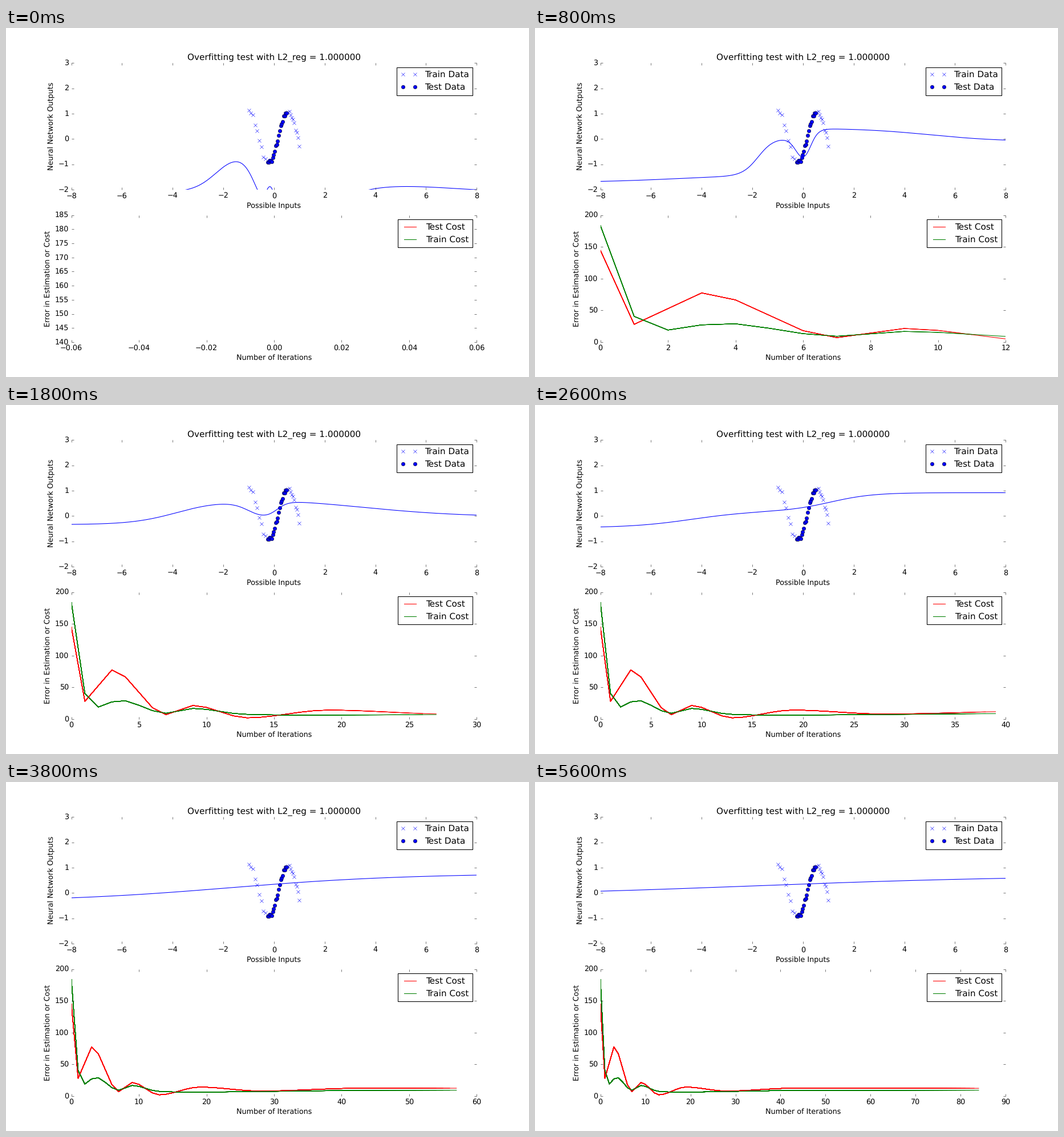
Recreate the animation shown at these times as a matplotlib script. Size 917 by 611 pixels, loop 5.8 s.

```python
import matplotlib.pyplot as plt
import numpy as np
from matplotlib.animation import FuncAnimation
from matplotlib.ticker import MultipleLocator

W, H = 917, 611
DPI = H / 8
FRAMES, STRIDE = 29, 3
LAST = (FRAMES - 1) * STRIDE

plt.style.use("classic")
plt.rcParams.update({
    "font.family": "DejaVu Sans",
    "text.hinting": "none",
    "figure.facecolor": "white",
    "savefig.dpi": "figure",
})

rng = np.random.default_rng(4)
steps = np.arange(LAST + 1)
grid = np.linspace(-8, 8, 801)


def noisy(x):
    """Samples of the wave the network has to learn."""
    return 0.05 + np.sin(4.1 * x - 0.67) + rng.uniform(-0.09, 0.09, len(x))


def swing(turns):
    """Cost curve easing from one turning point (step, cost) to the next."""
    at, cost = np.array(turns).T
    i = np.clip(np.searchsorted(at, steps, side="right") - 1, 0, len(at) - 2)
    u = (steps - at[i]) / (at[i + 1] - at[i])
    return cost[i] + (cost[i + 1] - cost[i]) * u * u * (3 - 2 * u)


def net(start, *units):
    """Network output: a start level plus tanh units (size, centre, weight)."""
    return start + sum(a * (1 + np.tanh(w * (grid - c))) for a, c, w in units)


train_x = np.r_[-1 + np.arange(9) / 12, 0.55 + np.arange(10) / 20]
test_x = np.linspace(-0.25, 0.5, 20)

test_cost = swing([(0, 144.8), (1, 28), (3, 77.5), (7, 7), (9, 21.5), (13, 2),
                   (19, 14.2), (28, 8), (43, 12.5), (LAST, 12.3)])
train_cost = swing([(0, 183.8), (1, 40.5), (2, 19), (3.5, 30), (7, 9.2),
                    (9, 16.8), (13, 7.5), (16, 6.3), (48, 9.2), (LAST, 9.3)])

# Network output after the given number of iterations
fits = {
    0: net(-2.1, (0.8, -2.25, 1.1), (-1.4, -0.7, 1.8), (0.65, -0.31, 6),
           (-0.65, 0.05, 6), (0.8, 2.3, 0.6), (-0.22, 6.8, 0.3)),
    12: net(-1.71, (0.15, -5, 0.3), (0.75, -1.77, 1.6), (-0.6, -0.25, 3),
            (0.775, 0.28, 3.2), (-0.27, 5, 0.35)),
    27: net(-0.335, (0.5, -3.8, 0.55), (-0.34, -1, 1.5), (0.37, 0.1, 2.2),
            (-0.38, 3.5, 0.25)),
    39: net(-0.46, (0.33, -4.4, 0.42), (0.36, 1.1, 0.6)),
    48: net(-0.53, (0.69, -1.7, 0.16)),
    69: net(-0.18, (0.45, -2, 0.09)),
    84: net(-0.14, (0.42, -2, 0.09)),
}


def fit_at(n):
    keys = list(fits)
    i = min(np.searchsorted(keys, n, side="right"), len(keys) - 1)
    a, b = keys[i - 1], keys[i]
    u = (n - a) / (b - a)
    return (1 - u) * fits[a] + u * fits[b]


def nice_step(span, bins=9):
    raw = span / bins
    base = 10.0 ** np.floor(np.log10(raw))
    return next(m * base for m in (1, 2, 5, 10) if m * base >= raw - 1e-9)


def set_scale(x0, x1, dx, y0, y1, dy):
    bottom.set_xlim(x0, x1)
    bottom.set_ylim(y0, y1)
    bottom.xaxis.set_major_locator(MultipleLocator(dx))
    bottom.yaxis.set_major_locator(MultipleLocator(dy))


fig = plt.figure(figsize=((W + 0.001) / DPI, H / DPI), dpi=DPI)
top = fig.add_subplot(211, frameon=False)
bottom = fig.add_subplot(212, frameon=False)

top.plot(train_x, noisy(train_x), "bx", label="Train Data")
top.plot(test_x, noisy(test_x), "bo", label="Test Data")
fit_line, = top.plot(grid, fits[0], "b-")
top.set_xlim(-8, 8)
top.set_ylim(-2, 3)
top.set_title("Overfitting test with L2_reg = 1.000000")
top.set_xlabel("Possible Inputs")
top.set_ylabel("Neural Network Outputs")
top.legend(loc="upper right")

# Every iteration plots the whole history again, so older parts look bolder
history = [
    bottom.plot(steps[:n + 1], test_cost[:n + 1], "r-")
    + bottom.plot(steps[:n + 1], train_cost[:n + 1], "g-")
    for n in steps
]
bottom.set_xlabel("Number of Iterations")
bottom.set_ylabel("Error in Estimation or Cost")
bottom.legend(history[0], ["Test Cost", "Train Cost"], loc="upper right")


def update(k):
    n = k * STRIDE
    fit_line.set_ydata(fit_at(n))
    for i, pair in enumerate(history):
        for line in pair:
            line.set_visible(i <= n)
    if n == 0:
        set_scale(-0.06, 0.06, 0.02, 140, 185, 5)
    else:
        dx = nice_step(n)
        set_scale(0, np.ceil(n / dx - 1e-9) * dx, dx, 0, 200, 50)
    return [fit_line]


update(0)
anim = FuncAnimation(fig, update, frames=FRAMES, interval=200, repeat=True,
                     repeat_delay=0, blit=False)
plt.show()
```
